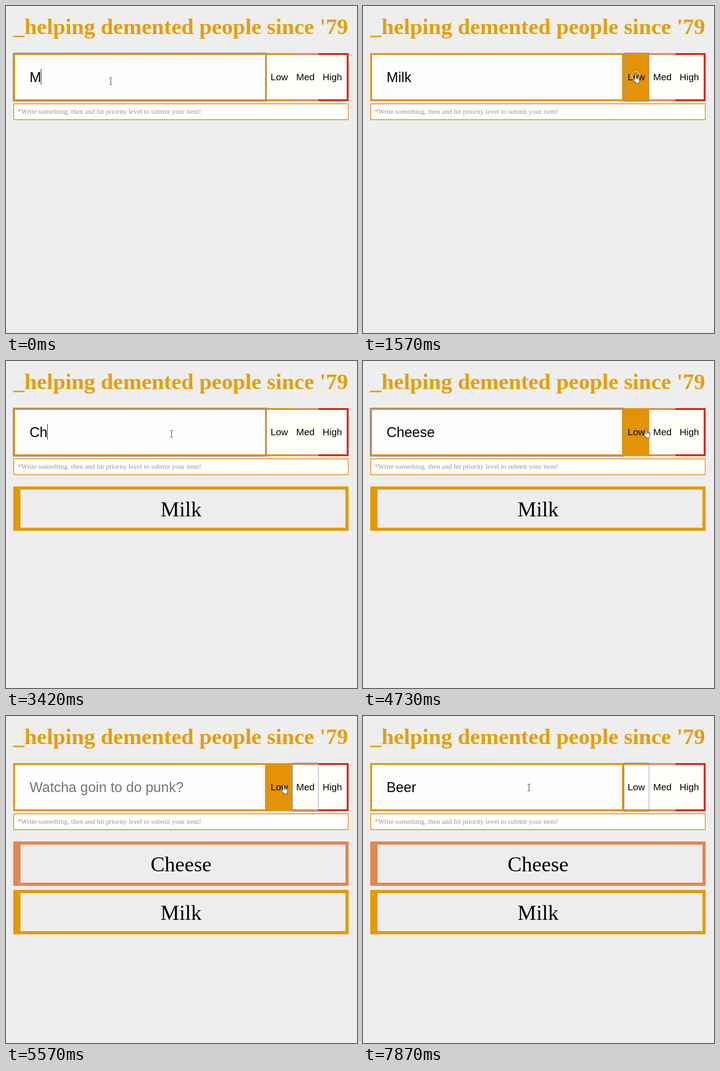
These frames come from a looping animation (775 px wide and 722 px high, 8000 ms). An HTML page:

```html
<!DOCTYPE html>
<html lang="en">
<head>
<meta charset="utf-8">
<title>To-do list</title>
<style>
  html, body { margin: 0; width: 100%; height: 100%; overflow: hidden; background: #eee; }
  svg { display: block; width: 100%; height: 100%; }
  .serif { font-family: "Liberation Serif", "Times New Roman", serif; }
  .sans { font-family: "Liberation Sans", Arial, sans-serif; }
  text { white-space: pre; }
</style>
</head>
<body>
<svg id="stage" viewBox="0 0 775 722"></svg>
<script>
const LOOP = 8000;
const PAPER = '#fffffb';
const COLORS = { title: '#e69e05', edge: '#e39206', low: '#e39305', med: '#e18751', high: '#db2208', item: '#e49b02' };
const PLACEHOLDER = 'Watcha goin to do punk?';
const stage = document.getElementById('stage');

function add(tag, attrs, parent = stage) {
  const el = document.createElementNS('http://www.w3.org/2000/svg', tag);
  for (const key in attrs) el.setAttribute(key, attrs[key]);
  parent.appendChild(el);
  return el;
}

function box(x, y, right, bottom, fill, parent) {
  return add('rect', { x, y, width: right - x, height: bottom - y, fill }, parent);
}

function label(str, x, y, size, fill, font, anchor = 'start', parent) {
  const el = add('text', { x, y, 'font-size': size, fill, class: font, 'text-anchor': anchor }, parent);
  el.textContent = str;
  return el;
}

function show(el, on) {
  el.setAttribute('visibility', on ? 'visible' : 'hidden');
}

// Static page
box(0, 0, 775, 722, '#eee');
label("_helping demented people since '79", 16, 61.5, 49.3, COLORS.title, 'serif')
  .setAttribute('font-weight', 'bold');
box(16, 215, 756.5, 252, '#e09d26');
box(18, 217, 754.7, 250, PAPER);
label('*Write something, then and hit priority level to submit your item!',
  25.5, 238, 15.44, '#949492', 'serif');

// Input field
box(16, 104, 576, 210, COLORS.edge);
box(20, 108, 572, 206, '#fefefe');
const inputRing = add('rect', {
  x: 15.8, y: 103.8, width: 560.4, height: 106.4, rx: 1, fill: 'none', stroke: '#8b8dcb', 'stroke-width': 1.7
});
const entry = label('', 52, 168, 30.86, '#000', 'sans');
const caret = box(52, 139, 53, 174, '#000');

// Priority buttons
const buttons = [
  { name: 'low', text: 'Low', x: 576, right: 632, inner: 632, textX: 584.3 },
  { name: 'med', text: 'Med', x: 632, right: 690, inner: 690, textX: 640.8 },
  { name: 'high', text: 'High', x: 690, right: 756.5, inner: 752.3, textX: 699 }
];
for (const b of buttons) {
  box(b.x, 104, b.right, 210, COLORS[b.name]);
  b.face = box(b.x, 108, b.inner, 206, PAPER);
  label(b.text, b.textX, 164, 20.9, '#000', 'sans');
}
for (const b of buttons) {
  b.ring = add('rect', {
    x: b.x + 0.5, y: 103.5, width: b.right - b.x - 1, height: 107, fill: 'none', stroke: '#8088d2'
  });
}

// List rows
function makeRow(text, color, slot) {
  const top = 276.6 + slot * 106.9;
  const at = dy => Math.round(top + dy);
  const g = add('g', {});
  box(16, at(0), 756.5, at(98.8), color, g);
  box(32, at(7.7), 749.5, at(91.2), '#ededed', g);
  label(text, 386.5, at(66), 46.5, '#000', 'serif', 'middle', g);
  return g;
}
const rows = [
  { el: makeRow('Milk', COLORS.item, 0), from: 1630, to: 5290 },
  { el: makeRow('Cheese', COLORS.med, 0), from: 5290, to: LOOP },
  { el: makeRow('Milk', COLORS.item, 1), from: 5290, to: LOOP }
];

// Pointers
const beam = add('path', {
  d: 'M-3 -7.5H-1Q0 -7.5 0 -6.5V6.5Q0 7.5 -1 7.5H-3M3 -7.5H1Q0 -7.5 0 -6.5M3 7.5H1Q0 7.5 0 6.5',
  fill: 'none', stroke: '#222'
});
const clickRing = add('g', { fill: 'none' });
add('circle', { r: 9, stroke: '#5a4a2c', 'stroke-width': 2.6 }, clickRing);
add('circle', { r: 9, stroke: '#fff', 'stroke-width': 1.4 }, clickRing);
const hand = add('path', {
  d: 'M4 12.5V2.2a1.6 1.6 0 0 1 3.2 0V8.5a1.4 1.4 0 0 1 2.5 0a1.4 1.4 0 0 1 2.4 .6' +
     'a1.3 1.3 0 0 1 2.2 .9V15.5q0 2 -1.2 3.7V21H6V19.4L.9 13.5q-.9 -1.8 .6 -2.3q1 -.3 2.5 1.3z' +
     'M7.2 8.5V12M9.7 8.8V12M12.1 9.4V12',
  fill: '#fff', stroke: '#222', 'stroke-linejoin': 'round'
});

// Timeline
const typing = [
  [0, 'M'], [190, 'Mi'], [340, 'Mil'], [460, 'Milk'], [1630, ''],
  [3210, 'C'], [3420, 'Ch'], [3570, 'Che'], [3720, 'Chee'], [3820, 'Chees'], [3930, 'Cheese'], [5290, ''],
  [6790, 'B'], [7100, 'Be'], [7280, 'Bee'], [7400, 'Beer']
];
const focus = [[0, 'input'], [1570, 'low'], [2060, 'input'], [5210, 'med'], [5850, 'input'], [7870, 'low']];
const caretOn = [[0, 960], [1490, 1570], [2060, 2630], [3150, 4430], [5000, 5210], [5850, 6360], [6790, 7870]];
const presses = [[1570, 1630], [2060, 2130], [5210, 5290], [5850, 5920]];
const start = [231, 165.5];
const moves = [
  { from: 830, to: 1490, steps: 9, end: [602, 151] },
  { from: 1720, to: 2060, steps: 6, end: [365, 161] },
  { from: 4370, to: 4730, steps: 6, end: [625, 150] },
  { from: 4820, to: 4820, steps: 1, end: [675, 150] },
  { from: 5360, to: 5360, steps: 1, end: [674, 151] },
  { from: 5450, to: 5850, steps: 7, end: [366, 157.5] }
];

const latest = (list, t) => list.filter(([at]) => at <= t).pop()[1];
const within = (spans, t) => spans.some(([a, b]) => t >= a && t < b);

function pointer(t) {
  let pos = start;
  for (const m of moves) {
    if (t < m.from) break;
    const gap = (m.to - m.from) / (m.steps - 1) || 1;
    const u = Math.min(1, (Math.floor((t - m.from) / gap + 1e-6) + 1) / m.steps);
    const k = u * u * (3 - 2 * u);
    const [x, y] = pos;
    pos = [x + (m.end[0] - x) * k, y + (m.end[1] - y) * k];
  }
  return pos;
}

function render(t) {
  const text = latest(typing, t);
  const focused = latest(focus, t);
  const [x, y] = pointer(t);
  const overButton = x >= 576;

  entry.textContent = text;
  const width = text ? entry.getComputedTextLength() : 0;
  if (!text) entry.textContent = PLACEHOLDER;
  entry.setAttribute('fill', text ? '#000' : '#757575');
  caret.setAttribute('x', Math.floor(52 + width));
  show(caret, within(caretOn, t));
  show(inputRing, focused === 'input');

  for (const b of buttons) {
    show(b.face, !(x >= b.x && x < b.right));
    show(b.ring, focused === b.name);
  }
  for (const r of rows) show(r.el, t >= r.from && t < r.to);

  show(beam, !overButton);
  show(hand, overButton);
  show(clickRing, within(presses, t));
  beam.setAttribute('transform', `translate(${Math.floor(x) + 0.5} ${Math.round(y)})`);
  hand.setAttribute('transform', `translate(${x - 5.6} ${y - 1})`);
  clickRing.setAttribute('transform', `translate(${x} ${y + 2})`);
}

function tick() {
  render(performance.now() % LOOP);
  requestAnimationFrame(tick);
}
tick();
</script>
</body>
</html>
```
